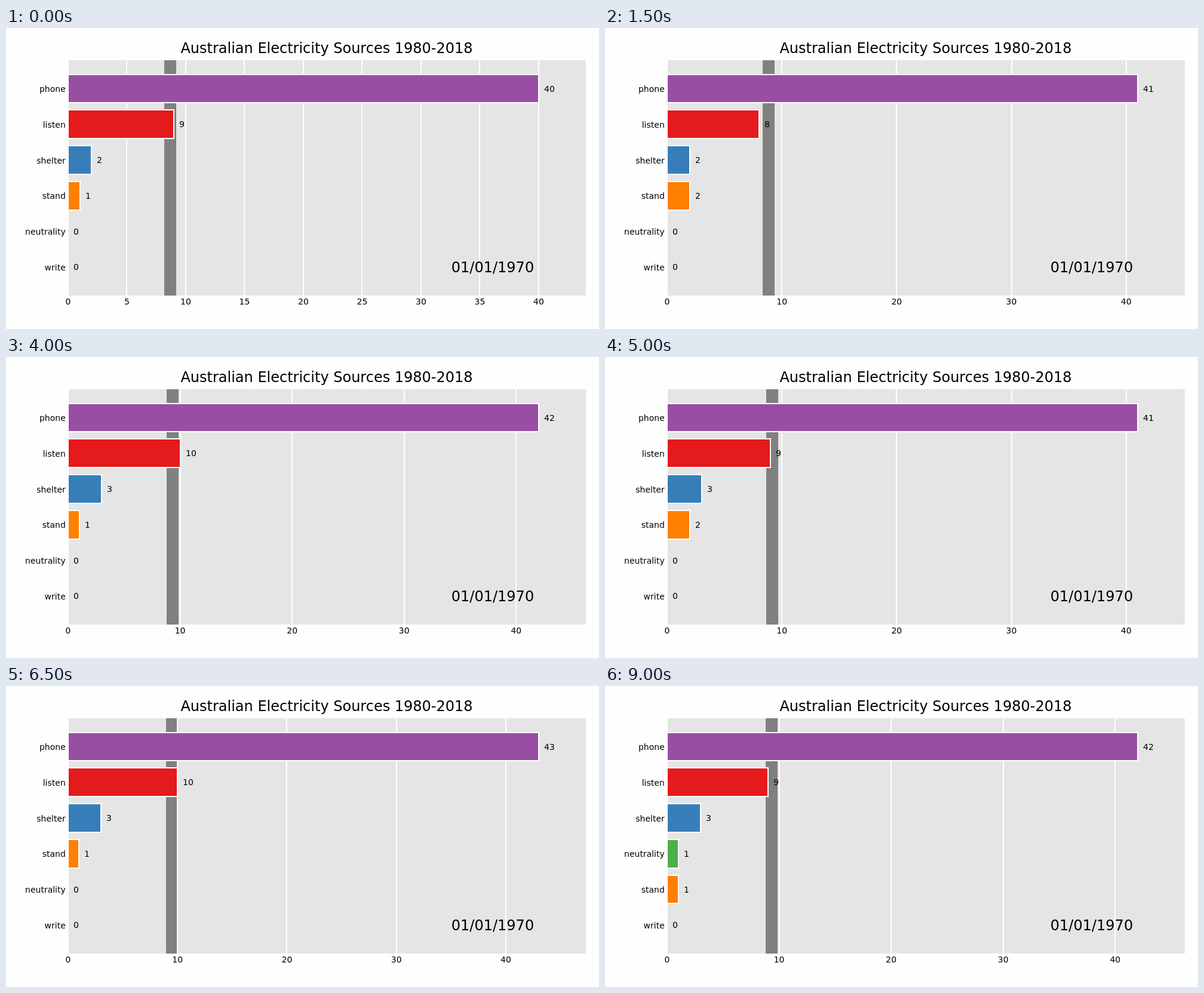
These frames come from a looping animation (993 by 504 pixels, 9050 ms). An HTML page:

```html
<!DOCTYPE html>
<html lang="en">
<head>
<meta charset="utf-8">
<title>Bar chart race</title>
<style>
  html, body { margin: 0; width: 100%; height: 100%; overflow: hidden; background: #fefefe; }
  svg { display: block; width: 993px; height: 504px; font: 14px "DejaVu Sans", sans-serif; }
</style>
</head>
<body>
<svg viewBox="0 0 993 504">
  <text x="537" y="42" font-size="24" text-anchor="middle">Australian Electricity Sources 1980-2018</text>
  <clipPath id="plot"><rect x="104" y="54" width="867" height="394"/></clipPath>
  <rect x="104" y="54" width="867" height="394" fill="#e5e5e5"/>
  <g id="chart"></g>
  <text x="815" y="409" font-size="24" text-anchor="middle">01/01/1970</text>
</svg>
<script>
const STEP = 500, LOOP = 9050, LAST = 18;
const LEFT = 104, TOP = 54, BOTTOM = 448, SPAN = 787.9;
const PITCH = (BOTTOM - TOP) / 6.6, FIRST_ROW = 101.6, HALF_BAR = PITCH * 0.4;

const { abs, cos, exp, floor, min, round, PI } = Math;

// Straight lines through [step, value] points, level after the last one.
function through(...points) {
  return k => {
    const i = points.findIndex(([step]) => step >= k);
    if (i < 0) return points[points.length - 1][1];
    if (i === 0) return points[0][1];
    const [[k0, v0], [k1, v1]] = points.slice(i - 1, i + 1);
    return v0 + (v1 - v0) * (k - k0) / (k1 - k0);
  };
}

// Listed alphabetically, which also decides ties in the ranking.
const SOURCES = {
  listen: {
    color: '#e41a1c',
    value: through([0, 9], [2, 7.6], [4, 8.6], [6, 7.6], [9, 11],
                   [10.5, 8.5], [12.5, 10.4], [15.5, 7.6], [17, 9])
  },
  neutrality: { color: '#4daf4a', value: k => floor(k / LAST) },
  phone: {
    color: '#984ea3',
    // A rise halfway through, with a ripple that swells to full size.
    value: k => 41 - exp(-3 * k) + 1.38 / (1 + exp(1.8 * (10.5 - k))) +
                min(0.79, 0.11 * k) * cos(2 * PI * (k - 8) / 2.65)
  },
  shelter: { color: '#377eb8', value: k => min(3, 1 + 0.7 * abs(k - 1)) },
  stand: {
    color: '#ff7f00',
    value: through([0, 0.6], [3, 1.6], [4, 1], [6.5, 3.4], [8.5, 0.6],
                   [10, 1.6], [13, 0.6], [16.5, 1.8], [18, 1.2])
  },
  write: { color: '#a65628', value: () => 0 }
};

const chart = document.getElementById('chart');

const vline = (x, width, color) =>
  `<path d="M${round(x)} ${TOP}V${BOTTOM}" stroke="${color}" stroke-width="${width}"/>`;
const label = (x, y, anchor, text) =>
  `<text x="${x}" y="${round(y)}" text-anchor="${anchor}">${text}</text>`;

function render(step) {
  const bars = Object.entries(SOURCES)
    .map(([name, { color, value }]) => ({ name, color, value: round(value(step)) }))
    .sort((a, b) => b.value - a.value);
  const max = bars[0].value;
  const px = v => LEFT + v * SPAN / max;
  const mean = bars.reduce((sum, bar) => sum + bar.value, 0) / bars.length;

  let shapes = vline(px(mean), 20, '#808080');
  let texts = '';

  const tick = max > 40 ? 10 : 5;
  for (let v = 0; v <= max; v += tick) {
    shapes += vline(px(v), 2, '#fff');
    texts += label(px(v), 463, 'middle', v);
  }

  bars.forEach(({ name, color, value }, i) => {
    const y = FIRST_ROW + i * PITCH, end = px(value);
    const top = round(y - HALF_BAR), bottom = round(y + HALF_BAR);
    if (value) {
      shapes += `<rect x="${LEFT}" y="${top}" width="${round(end) - LEFT}" ` +
        `height="${bottom - top}" fill="${color}" stroke="#fff" stroke-width="2"/>`;
    }
    texts += label(99.8, y + 5.6, 'end', name);
    texts += label(round(end + 9), y + 5.15, 'start', value);
  });

  chart.innerHTML = `<g clip-path="url(#plot)">${shapes}</g>${texts}`;
}

const start = performance.now();
let shown = -1;

function frame() {
  const time = (performance.now() - start) % LOOP;
  const step = min(floor(time / STEP), LAST);
  if (step !== shown) {
    shown = step;
    render(step);
  }
  requestAnimationFrame(frame);
}
frame();
</script>
</body>
</html>
```
